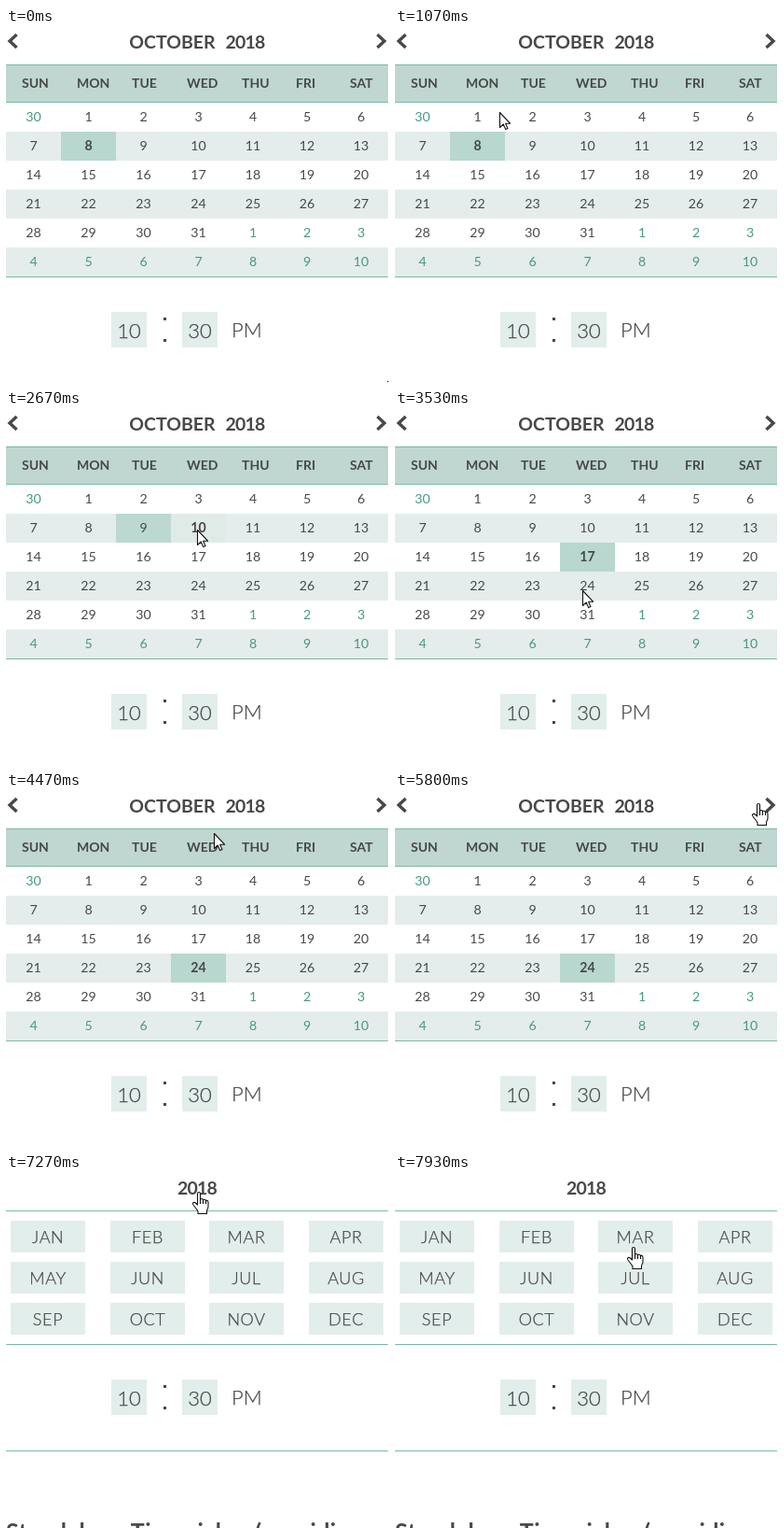
Animation of 411 by 379 pixels, one loop 8000 ms. Source, as an HTML page:

```html
<!DOCTYPE html>
<html lang="en">
<head>
<meta charset="utf-8">
<title>Date picker</title>
<style>
html, body { margin: 0; width: 100%; height: 100%; overflow: hidden; background: #fff; }
svg { display: block; width: 411px; height: 379px; font-family: Lato, "Open Sans", sans-serif; fill: #484848; }
.title { font-size: 19.5px; font-weight: 700; text-anchor: middle; }
.year { letter-spacing: -.8px; }
.head { font-size: 14px; font-weight: 700; }
.day { font-size: 14.2px; text-anchor: middle; }
.dim { fill: #459a80; }
.bold { font-weight: 700; }
.month, .clock { font-weight: 300; stroke: #484848; stroke-width: .25; }
.month { font-size: 18px; letter-spacing: .6px; text-anchor: middle; }
.clock { font-size: 22px; }
.mid { text-anchor: middle; }
.note { font-size: 25px; font-weight: 700; letter-spacing: .4px; }
.chev { fill: none; stroke: #484848; stroke-width: 3.4; }
#cursor { fill: #fff; stroke: #111; stroke-width: 1.1; stroke-linejoin: round; }
</style>
</head>
<body>
<svg viewBox="0 0 411 379">
  <g id="view"></g>
  <path id="cursor"/>
</svg>
<script>
const FPS = 15, STEPS = 120;
const INK = '#484848', BAND = '#e4edeb', BUTTON = '#e2eeeb', BAR = '#bfd7d0', PICK = '#b7d7cf', LINE = '#7cb8ab';
const DAYS = ['SUN', 'MON', 'TUE', 'WED', 'THU', 'FRI', 'SAT'];
const MONTHS = ['JANUARY', 'FEBRUARY', 'MARCH', 'APRIL', 'MAY', 'JUNE', 'JULY',
  'AUGUST', 'SEPTEMBER', 'OCTOBER', 'NOVEMBER', 'DECEMBER'];

// Cursor moves: first step, last step, goal x, goal y, downward bow
const MOVES = [
  [3, 4, 440, 420], [13, 14, 100, 19], [14, 21, 141, 130, 50], [29, 32, 232, 107],
  [34, 38, 205, 128], [41, 47, 204, 161, 40], [50, 53, 201, 193], [56, 59, 205, 213],
  [60, 68, 226, 20], [74, 77, 224, 11], [78, 82, 390, 12],
  [97, 105, 207, 19, 50], [113, 119, 256, 78, 20]
];
// Start of each fade and the day it selects
const PICKS = [[-1, 8], [25.5, 9], [39.9, 10], [48.7, 17], [56.5, 24]];

const ARROW = 'M.5.5V16.5L4.2 13 6.7 18.6 9 17.6 6.6 12.2H11.6Z';
const HAND = 'M-1.5 14V2Q-1.5.5 0 .5T1.5 2V8.5Q1.5 7.5 3 7.5T4.5 9Q4.5 8.2 6 8.2T7.5 10' +
  'Q7.8 9.2 8.8 9.4T10 11V16Q10 18 8.5 20V23.5H-1V21Q-2 19-4.5 16T-6.5 12.5' +
  'Q-5.5 10.5-3.5 12ZM1.5 8.5V13M4.5 9V13M7.5 10V13';

const view = document.getElementById('view');
const cursor = document.getElementById('cursor');

const edge = i => Math.min(59 * i, 58 * i + 4);
const buttonX = i => Math.round(5 + 106.7 * i);
const rect = (x, y, w, h, fill, alpha = 1) =>
  `<rect x="${x}" y="${y}" width="${w}" height="${h}" fill="${fill}" fill-opacity="${alpha}"/>`;
const text = (x, y, cls, s) => `<text x="${x}" y="${y}" class="${cls}">${s}</text>`;
const rule = y => rect(0, y, 410, 1, LINE);
const year = dx => `<tspan class="year" dx="${dx}">2018</tspan>`;

function clock(y) {
  const box = (x, s) => rect(x, y, 38, 38, BUTTON) + text(x + 19, y + 28, 'clock mid', s);
  const dot = dy => rect(169, y + dy, 3, 3, INK);
  return box(113, '10') + dot(6) + dot(29) + box(189, '30') + text(242, y + 27, 'clock', 'PM');
}

function pickAt(n) {
  const i = PICKS.findLastIndex(p => n >= p[0]);
  return { day: PICKS[i][1], last: i ? PICKS[i - 1][1] : 0, mix: Math.min(1, n - PICKS[i][0]) };
}

function calendar(m, pick = {}) {
  let out = text(205, 22, 'title', MONTHS[m] + year(11)) +
    '<path class="chev" d="M11.5 7L4 14l7.500 7M398.500 7l7.500 7l-7.500 7"/>' +
    rect(0, 39, 410, 41, BAR) + rule(39) + rule(79);
  DAYS.forEach((d, i) => out += text(edge(i) + 17, 64, 'head', d));
  for (let r = 1; r < 6; r += 2) out += rect(0, 80 + 31 * r, 410, 31, BAND);
  out += rule(266);
  const first = new Date(2018, m, 1).getDay();
  for (let i = 0; i < 42; i++) {
    const date = new Date(2018, m, i - first + 1), day = date.getDate();
    const x = edge(i % 7), w = edge(i % 7 + 1) - x, y = 80 + 31 * Math.floor(i / 7);
    const here = date.getMonth() === m, chosen = here && day === pick.day;
    const alpha = chosen ? pick.mix : here && day === pick.last ? 1 - pick.mix : 0;
    if (alpha) out += rect(x, y, w, 31, PICK, alpha);
    out += text(x + w / 2, y + 20, 'day' + (here ? '' : ' dim') + (chosen ? ' bold' : ''), day);
  }
  return out + clock(304);
}

function monthList() {
  let out = text(205, 22, 'title', year(0)) + rule(39);
  MONTHS.forEach((name, i) => {
    const x = buttonX(i % 4), y = 50 + 44 * Math.floor(i / 4);
    out += rect(x, y, 80, 34, BUTTON) + text(x + 40, y + 24, 'month', name.slice(0, 3));
  });
  return out + rule(182) + clock(220) + rule(296) +
    text(0, 392, 'note', 'Standalone Timepicker (providing');
}

function place(n) {
  let x = 409, y = 378;
  for (const [from, to, gx, gy, bow = 0] of MOVES) {
    if (n <= from) break;
    const k = Math.min(1, (n - from) / (to - from));
    x += (gx - x) * k;
    y += (gy - y) * k + bow * Math.sin(Math.PI * k);
  }
  return [Math.round(x), Math.round(y)];
}

function overLink(x, y, list) {
  if (y < 20 && x > 126 && x < 284) return true;
  if (list) return (x - 5) % 106.7 < 80 && y >= 50 && y < 172 && (y - 50) % 44 < 34;
  return x > 380 && y < 25;
}

function draw(n) {
  const list = n >= 109;
  view.innerHTML = list ? monthList()
    : n >= 95 ? calendar(11)
    : n >= 89 ? calendar(10)
    : calendar(9, pickAt(n));
  const [x, y] = place(n);
  cursor.setAttribute('d', overLink(x, y, list) ? HAND : ARROW);
  cursor.setAttribute('transform', `translate(${x} ${y})`);
}

let shown = -1;
const begin = performance.now();
function tick() {
  const n = Math.floor((performance.now() - begin) * FPS / 1000 + .06) % STEPS;
  if (n !== shown) draw(shown = n);
  requestAnimationFrame(tick);
}
tick();
</script>
</body>
</html>
```
